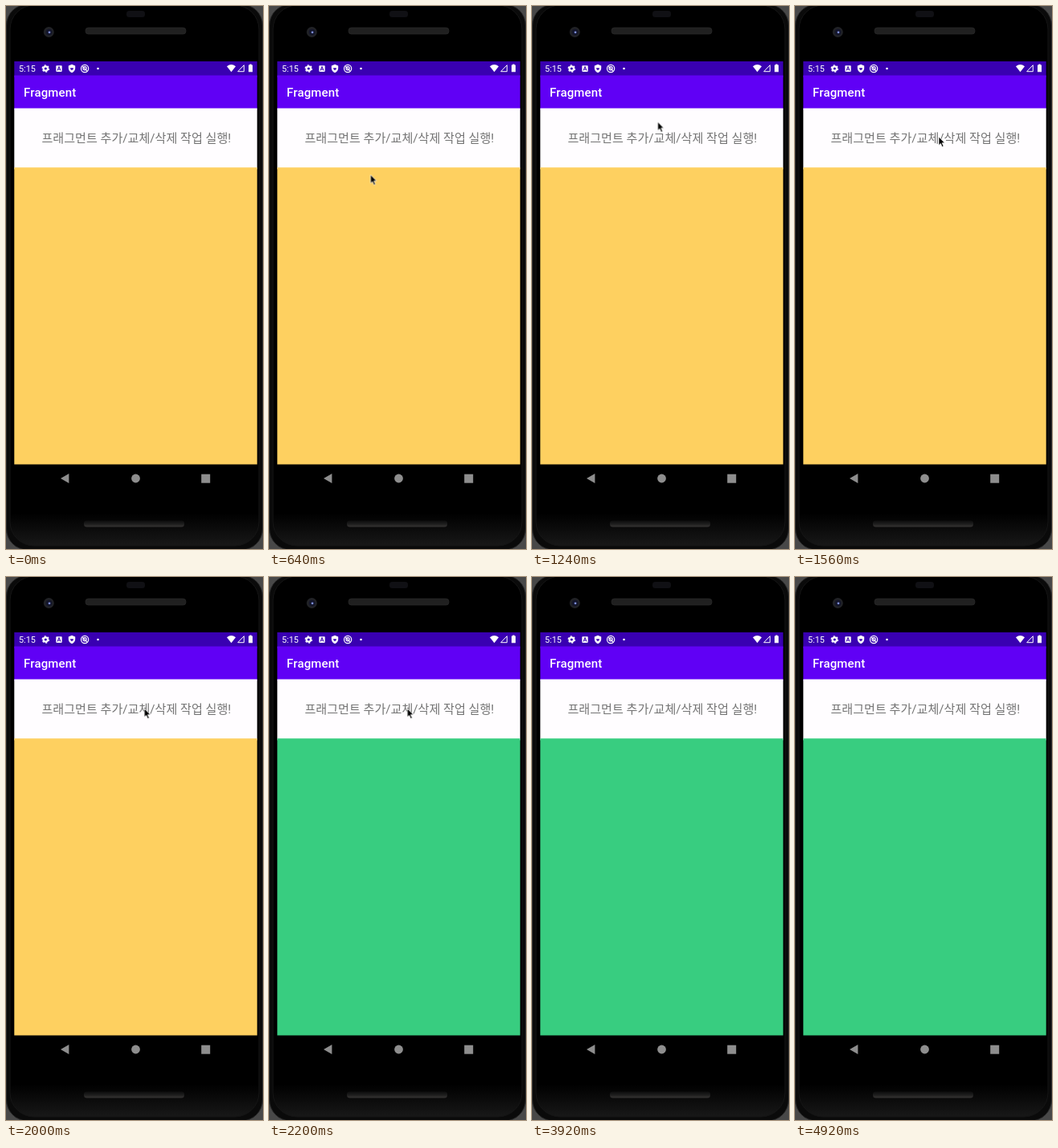
An HTML page for the animation above (5240 ms loop, 320x677 px).

```html
<!DOCTYPE html>
<html lang="ko">
<head>
<meta charset="utf-8">
<title>Fragment</title>
<style>
html, body { margin: 0; width: 100%; height: 100%; overflow: hidden; background: #000; }
svg { display: block; width: 320px; height: 677px; }
text { font-family: Roboto, "Noto Sans CJK KR", "Noto Sans CJK", sans-serif; }

#pane { fill: #fed060; animation: swap 5240ms step-end infinite; }
@keyframes swap {
  0% { fill: #fed060; }
  41.98%, 100% { fill: #38cd80; }
}

#cursor { animation: show 5240ms step-end infinite, move 5240ms linear infinite; }
@keyframes show {
  0% { visibility: hidden; }
  8.39% { visibility: visible; }
  67.17%, 100% { visibility: hidden; }
}
@keyframes move {
  0%, 8.39% { transform: translate(27px, 294px); }
  9.92% { transform: translate(76px, 250px); }
  11.45% { transform: translate(116px, 219px); }
  12.21%, 13.73% { transform: translate(126.5px, 210.5px); }
  17.55%, 19.08% { transform: translate(137px, 185px); }
  21.37% { transform: translate(145px, 160px); }
  23.66% { transform: translate(156.5px, 144.5px); }
  26.72% { transform: translate(171px, 150px); }
  29.77% { transform: translate(179px, 163px); }
  33.97% { transform: translate(175px, 166px); }
  38.16%, 63.34% { transform: translate(172.3px, 164px); }
  63.35% { transform: translate(160.5px, 164.5px); }
  64.88% { transform: translate(92px, 182px); }
  66.41%, 100% { transform: translate(-2px, 208px); }
}
</style>
</head>
<body>
<svg viewBox="0 0 320 677">
  <defs>
    <linearGradient id="body" x2="0" y2="1">
      <stop offset=".94" stop-color="#000"/>
      <stop offset="1" stop-color="#181818"/>
    </linearGradient>
    <linearGradient id="slot" x2="0" y2="1">
      <stop offset="0" stop-color="#0c0c0c"/>
      <stop offset=".5" stop-color="#1c1c1c"/>
      <stop offset="1" stop-color="#363433"/>
    </linearGradient>
  </defs>

  <!-- phone body -->
  <rect width="320" height="677" fill="#484848"/>
  <rect x=".5" y="-2" width="319" height="680" rx="26" fill="#0a0a0a" stroke="#2a2a2a"/>
  <rect x="5" y="-1" width="310" height="674" rx="30" fill="url(#body)" stroke="#151515"/>
  <rect x="150" y="6" width="23" height="8" rx="3.5" fill="#101014"/>
  <rect x="99" y="27" width="125" height="8" rx="3.5" fill="#202020" stroke="#2a2a2a" stroke-width=".7"/>
  <rect x="97" y="641.5" width="125" height="8" rx="3.5" fill="url(#slot)"/>
  <circle cx="53.3" cy="32.5" r="6.5" fill="#212226"/>
  <circle cx="53.6" cy="32.6" r="3.8" fill="#13152a"/>
  <circle cx="54" cy="32.8" r="1.4" fill="#7f90dc"/>

  <!-- screen: each band overlaps the one before it -->
  <g id="screen">
    <rect x="10.3" y="69" width="302.4" height="20" fill="#3900b1"/>
    <rect x="10.3" y="86.5" width="302.4" height="43" fill="#6000f5"/>
    <rect x="10.3" y="127.5" width="302.4" height="76" fill="#fffdff"/>
    <rect id="pane" x="10.3" y="201.3" width="302.4" height="370.2"/>
  </g>

  <!-- status bar -->
  <g fill="#fff">
    <text x="16" y="82" font-size="10.8">5:15</text>
    <circle cx="49.3" cy="78" r="2.7" fill="none" stroke="#fff" stroke-width="2.2"/>
    <circle cx="49.3" cy="78" r="4.1" fill="none" stroke="#fff" stroke-width="1.3" stroke-dasharray="2.1 2.193"/>
    <rect x="62.3" y="74.3" width="7.4" height="7.6" rx=".8"/>
    <path d="M64 80.5 66 75.5 68 80.5M64.8 79H67.2" fill="none" stroke="#3900b1"/>
    <path d="M82 72.8 86.2 74.5V77.5Q86.2 81.4 82 83.2 77.8 81.4 77.8 77.5V74.5Z"/>
    <path d="M80.2 77.3H83.8V78.5L82 80.2 80.2 78.5Z" fill="#3900b1"/>
    <g fill="none" stroke="#fff" stroke-width="1.2">
      <circle cx="98.1" cy="78" r="4.6"/>
      <circle cx="98.1" cy="77.8" r="2.1"/>
      <path d="M95.300 75.300 101.300 81.300"/>
    </g>
    <circle cx="114.500" cy="78" r="1.300"/>
    <path d="M275 75.200Q280.500 70.900 286 75.200L280.500 82.300Z"/>
    <path d="M288.700 81.700H296.300V73.700Z" fill="none" stroke="#fff"/>
    <path d="M302 73.500H303.400V72.500H305.600V73.500H307V82.300H302Z"/>
    <text x="22" y="112.800" font-size="15" font-weight="500" letter-spacing=".15">Fragment</text>
  </g>

  <text x="44.400" y="170" font-size="15.1" fill="#747474">프래그먼트 추가/교체/삭제 작업 실행!</text>

  <!-- navigation -->
  <g fill="#8e8e8e">
    <path d="M68 589 78.400 583V595Z"/>
    <circle cx="161.500" cy="589" r="5.400"/>
    <rect x="243.200" y="583.700" width="11" height="11"/>
  </g>

  <path id="cursor" d="M0 0V10.500L2.400 8.400 4.200 12.600 6 11.800 4.200 7.700H7.400Z" fill="#000" stroke="#fff" stroke-width=".7"/>
</svg>
</body>
</html>
```
